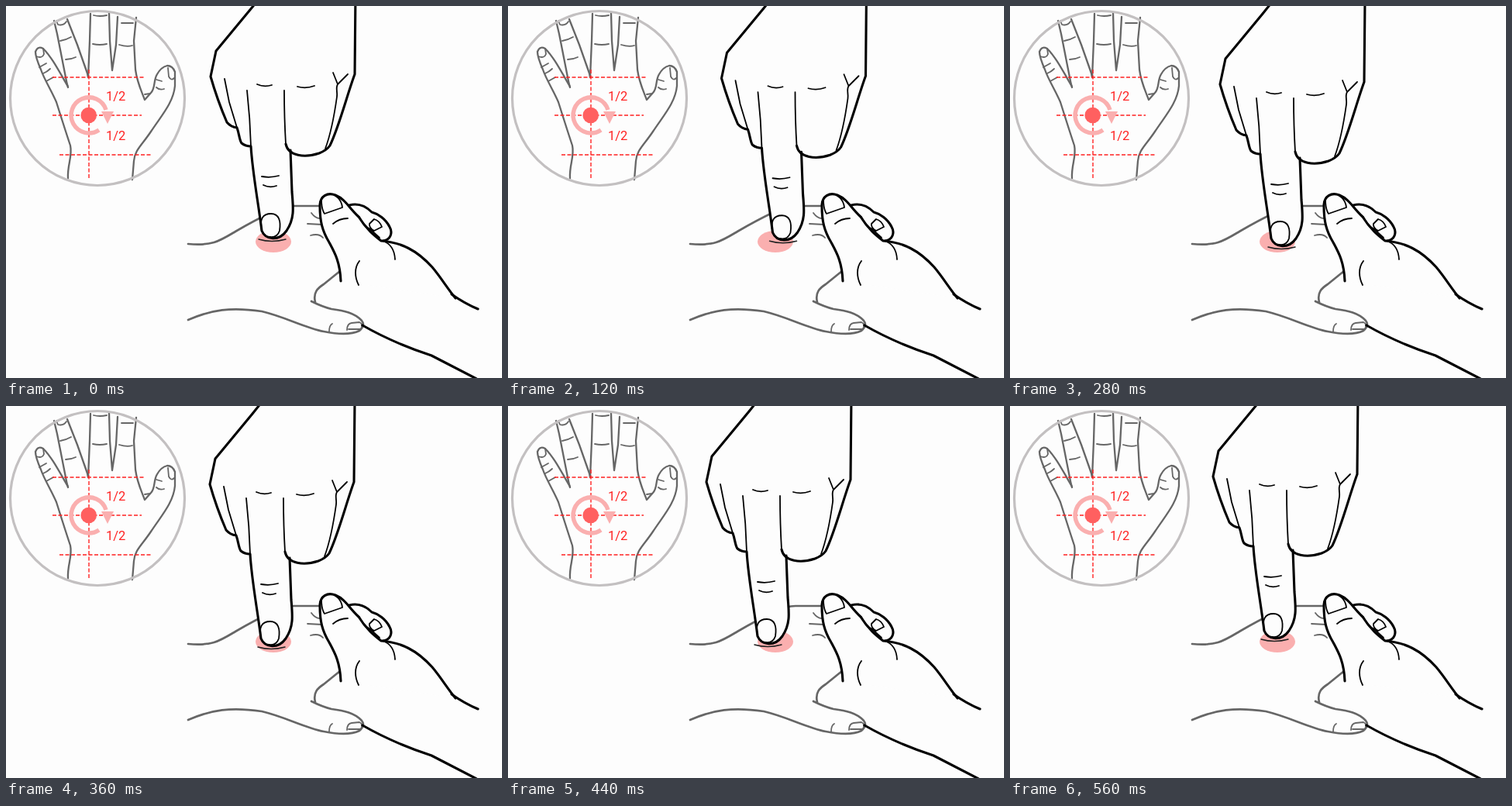
Recreate the animation shown at these times as an HTML page. Size 640 px wide and 480 px high, loop 0.6 s.

```html
<!DOCTYPE html>
<html lang="en">
<head>
<meta charset="utf-8">
<title>Hand pressure point massage</title>
<style>
html, body { margin: 0; width: 100%; height: 100%; overflow: hidden; background: #fdfdfd; }
svg { display: block; width: 640px; height: 480px; }
path { fill: none; stroke: #000; stroke-width: 1.8; stroke-linecap: round; stroke-linejoin: round; }
.bold { stroke-width: 3.1; }
.solid { fill: #fdfdfd; stroke: none; }
.outlined { stroke: #000; }
.grey path { stroke: #666; stroke-width: 2.3; }
.grey .wide { stroke-width: 2.7; }
.grey .fine { stroke-width: 1.8; }
.guide { stroke: #f22; stroke-width: 1.4; stroke-dasharray: 5 2.5; stroke-linecap: butt; }
.dent { stroke: #222; stroke-width: 1.5; }
text { font: 16.5px Roboto, sans-serif; fill: #f22; }
</style>
</head>
<body>
<svg viewBox="0 0 640 480">
  <!-- inset -->
  <g class="grey">
    <path d="M80 222C79 205 86 194 83 180C77 162 71 143 65 124C58 108 49 94 45 82Q38 66 38 59Q41 51 48 55C58 65 65 78 80 104"/>
    <path d="M62 19L66 36L77 92Q78 98 80 105M79 17L92 50L105 87L106 92"/>
    <path d="M109 10L108 45L106 92M133 9L134 45L137 83L142 50L144 14"/>
    <path d="M168 15L165 45L167 82C169 98 174 108 179 121L187 112C193 106 190 96 195 88Q200 79 208 77Q215 77 218 85L218 103C216 125 200 142 187 162C175 180 166 186 165 200L163 224"/>
    <path class="fine" d="M39 65Q47 68 49 62L48 55M43 79L52 74M48 87Q53 85 57 81M52 97L61 92M65 19L67 24Q74 26 78 20M70 45Q77 44 84 40M77 69Q84 69 90 66"/>
    <path class="fine" d="M112 49Q121 51 130 49M113 12Q121 14 130 12M146 50Q156 53 163 51M149 22L164 22M209 80L210 91Q213 97 217 93M194 95L201 97M194 105Q198 109 204 107M179 114L186 113"/>
  </g>
  <path class="guide" d="M60 92H179M60 141H175M69 192H187M107 82V222"/>
  <circle cx="118" cy="119" r="112.5" fill="none" stroke="#c3c0c1" stroke-width="3.2"/>
  <path d="M129 134A23 23 0 1 0 120 160" style="stroke:#faafaf;stroke-width:5.5;stroke-linecap:butt"/>
  <path d="M123 136H139L131 152Z" style="fill:#faafaf;stroke:none"/>
  <circle cx="106.7" cy="141" r="10.3" fill="#ff6060"/>
  <text x="129" y="122">1/2</text>
  <text x="129" y="173">1/2</text>

  <!-- receiving hand -->
  <g class="grey">
    <path class="wide" d="M235 307C266 310 276 303 296 291C308 284 326 274 343 266C355 260 362 258 371 258H408"/>
    <path class="wide" d="M235 405C265 392 290 388 330 394C360 401 385 415 410 420C430 424 446 424 456 419Q464 412 459 406C450 396 436 393 420 391C408 388 400 384 394 381M399 382C396 370 402 364 410 359L431 342"/>
    <path class="fine" d="M417 420Q417 412 421 410M440 418Q440 410 446 409L456 408Q461 410 458 417M442 417H457M394 267Q399 274 405 274M389 281L408 282M393 296Q404 293 409 299"/>
  </g>
  <ellipse cx="345" cy="304" rx="23" ry="14" fill="#faafaf"/>

  <!-- pressing hand -->
  <g id="press">
    <path class="solid" d="M319 0L271 58L264 91L285 150L297 157L303 177L316 182L330 290Q345 310 362 290L371 265L367 188L404 190L418 180L450 88V-20H319Z"/>
    <path class="bold" d="M335 -20L319 0L271 58L264 91C270 112 279 136 285 150Q290 156 298 157C301 165 301 173 304 177Q309 181 316 181C318 215 325 250 330 290C335 302 352 304 362 290C372 275 371 262 369 240Q368 210 367 186"/>
    <path class="bold" d="M361 178C364 194 386 196 404 190Q414 186 418 180C430 155 440 115 450 88L451 -20"/>
    <path d="M311 109Q315 145 316 181M359 109Q359 145 361 178M282 94L288 124L298 157M422 86L428 101L441 88M428 101C425 106 428 111 427 117Q421 160 412 184"/>
    <path d="M324 101Q333 105 343 102M376 104Q387 107 398 103M330 220Q341 222 352 219M332 231Q340 235 349 232"/>
    <path class="dent" d="M326 301Q343 306 361 301"/>
    <path d="M330 290C327 275 331 268 342 268C352 268 355 277 353 290Q350 299 341 298Q333 298 330 290"/>
  </g>

  <!-- supporting hand -->
  <path class="bold solid outlined" d="M443 257C455 254 465 259 472 266C480 268 490 275 495 285C499 292 497 302 486 303"/>
  <path d="M456 272Q461 283 470 288L482 299M469 281L475 275Q482 277 485 285L475 290Q468 286 469 281"/>
  <path class="bold solid outlined" d="M432 355C431 330 424 318 417 305C408 290 405 278 405 258C405 245 415 240 425 244C439 250 441 259 455 272C465 288 475 296 484 303C510 305 530 315 550 337C561 350 570 365 580 377"/>
  <path class="bold" d="M575 372Q592 384 609 391M460 412Q500 435 549 451L607 481"/>
  <path d="M407 250Q407 262 411 268L434 260Q433 250 425 245M422 281Q430 274 441 274M456 329C449 338 450 350 455 360M486 303Q501 308 502 327"/>
</svg>
<script>
const STEP = 40, STEPS = 15;
// [step, dx, dy] along the circular rubbing motion
const keys = [
  [0, 0, 0], [2, 8, 0], [4, 15, 4.5], [5, 15, 7], [7, 7, 10],
  [9, -1, 10], [11, -8, 7], [12, -10, 4.5], [14, -2, 0], [15, 0, 0]
];
const press = document.getElementById('press');

function offsetAt(step) {
  const i = keys.findIndex(k => k[0] > step);
  const [a, b] = [keys[i - 1], keys[i]];
  const p = (step - a[0]) / (b[0] - a[0]);
  return [1, 2].map(n => a[n] + (b[n] - a[n]) * p);
}

function draw() {
  const step = Math.floor(performance.now() / STEP) % STEPS;
  press.setAttribute('transform', `translate(${offsetAt(step)})`);
  requestAnimationFrame(draw);
}
draw();
</script>
</body>
</html>
```
